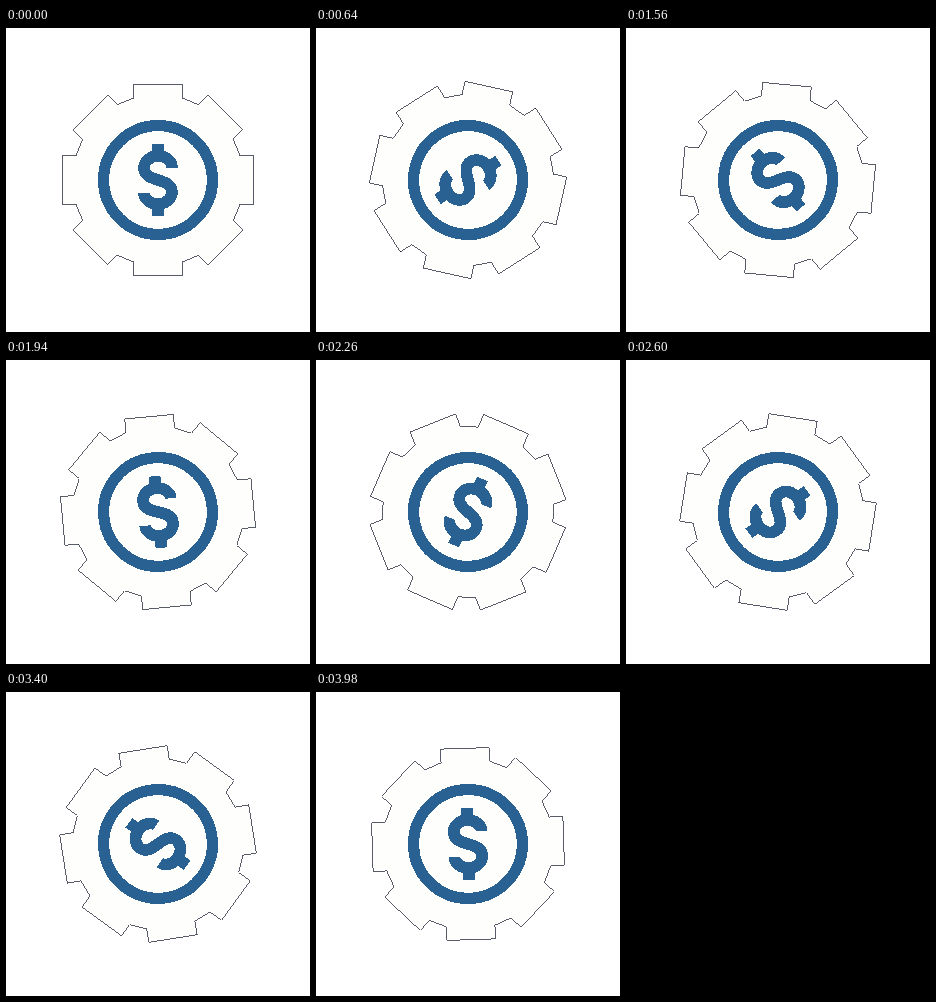
These frames come from a looping animation (304x304 px, 4 s). An HTML page:

```html
<!DOCTYPE html>
<html lang="en">
<head>
<meta charset="utf-8">
<title>Turning gear coin</title>
<style>
  html, body { margin: 0; width: 100%; height: 100%; overflow: hidden; background: #fff; }
  svg { display: block; width: 100%; height: 100%; shape-rendering: crispEdges; }
  #gear { fill: #fefefc; stroke: #101828; stroke-width: .7; }
  .ink { fill: none; stroke: #296292; }
  .ring { stroke-width: 11.2; }
  .sign { stroke-width: 11.6; }
</style>
</head>
<body>
<svg viewBox="-152 -152 304 304">
  <g id="wheel">
    <path id="gear"/>
    <circle class="ink ring" r="54.4"/>
    <path class="ink sign" d="M14-12.5A14 11.5 0 0 0 0-24A14 12 0 0 0-14-12.5C-14-5-8-2.5 0 0C8 2.5 14 5 14 12.5A14 12 0 0 1 0 24A14 11.5 0 0 1-14 12.5"/>
    <path class="ink sign" d="M0-36V-24M0 24V36"/>
  </g>
</svg>
<script>
  const TEETH = 8, TIP = 95.7, ROOT = 82, HALF = 24.4;
  const LOOP = 4000, STEP = 20;
  const SLACK = 1; // ms, absorbs clock rounding

  const tooth = [[-HALF, -ROOT], [-HALF, -TIP], [HALF, -TIP], [HALF, -ROOT]];
  const points = [];
  for (let i = 0; i < TEETH; i++) {
    const a = i * 2 * Math.PI / TEETH, c = Math.cos(a), s = Math.sin(a);
    for (const [x, y] of tooth) {
      points.push((x * c - y * s).toFixed(2) + ' ' + (x * s + y * c).toFixed(2));
    }
  }
  document.getElementById('gear').setAttribute('d', 'M' + points.join('L') + 'Z');

  // Turning by attribute redraws the edges sharply at every angle.
  const wheel = document.getElementById('wheel');
  const start = performance.now();
  function draw() {
    const step = Math.floor((performance.now() - start + SLACK) / STEP);
    const angle = step * STEP % LOOP / LOOP * 360;
    wheel.setAttribute('transform', `rotate(${angle})`);
    requestAnimationFrame(draw);
  }
  draw();
</script>
</body>
</html>
```
